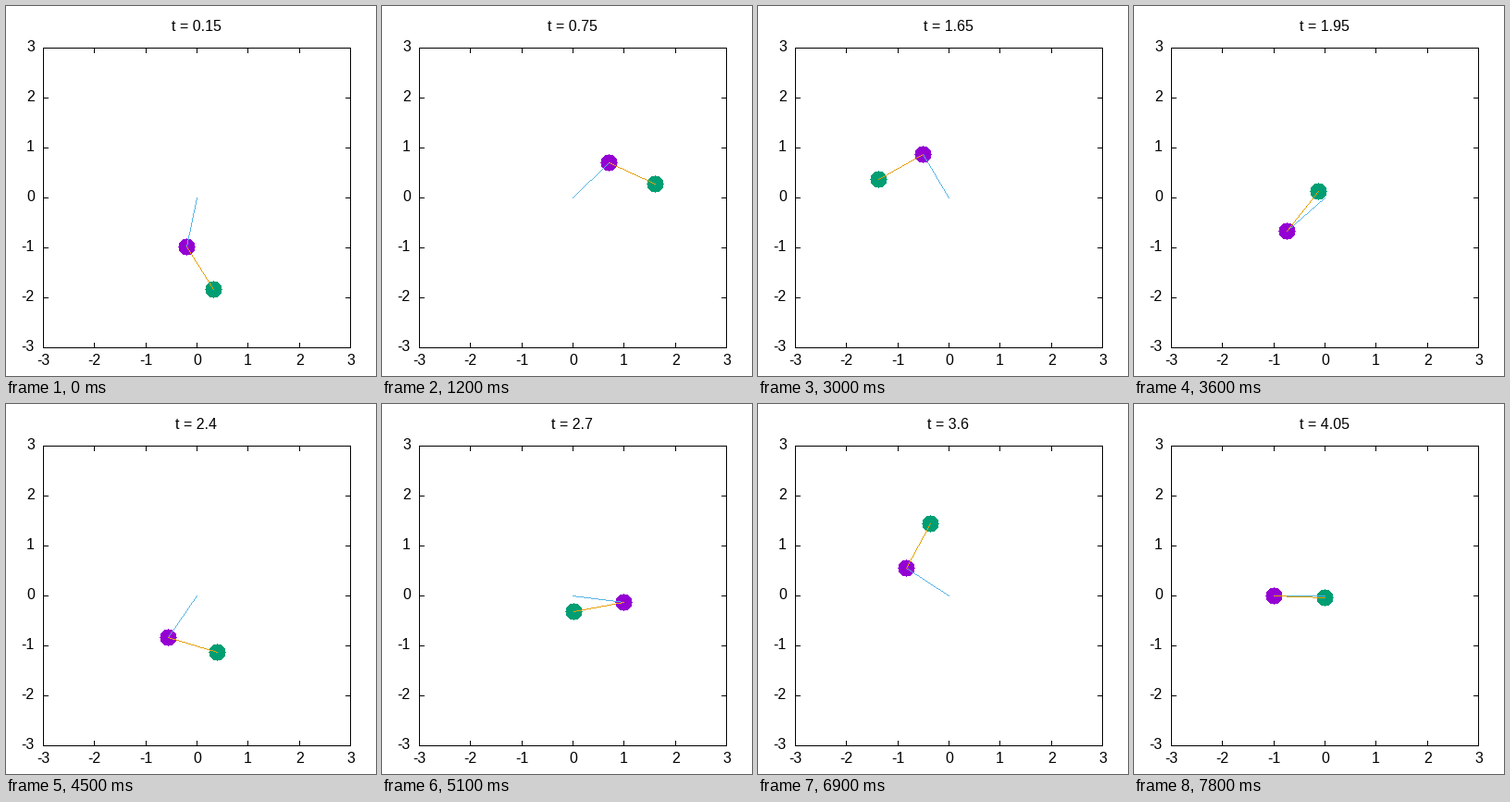
A matplotlib script for the animation above (8 s loop, 400x400 px).

```python
import math

import matplotlib.pyplot as plt
import numpy as np
from matplotlib.animation import FuncAnimation
from matplotlib.colors import to_rgb

SIZE, DPI = 400, 100
LEFT, RIGHT, TOP, BOTTOM = 40, 372, 45, 369
LIMIT, TICK, RADIUS = 3, 5, 9
POSES, DT, SUBSTEPS = 27, 0.15, 20
PURPLE, GREEN, BLUE, ORANGE = "#9400d3", "#009e73", "#56b4e9", "#e69f00"
FONT_PX = 16
TURN = 2 * math.pi

# Known poses: step number and the two unwrapped rod angles from straight down.
KEY_STEPS = [0, 7, 12, 15, 19, 23, 26]
KEY_ANGLES = np.array([
    (-0.200, 0.545),
    (3.160, 0.063 + 2 * TURN),
    (-0.838 + TURN, 2.499 + 3 * TURN),
    (-0.592 + TURN, 1.271 + 4 * TURN),
    (1.664 + TURN, 2.012 + 5 * TURN),
    (4.123 + TURN, 2.646 + 6 * TURN),
    (-1.571 + 2 * TURN, 1.534 + 7 * TURN),
])


def derivative(state, g):
    """Double pendulum with equal masses and unit rods."""
    a, b, va, vb = state
    c, s = math.cos(a - b), math.sin(a - b)
    x = -s * vb * vb - 2 * g * math.sin(a)
    y = s * va * va - g * math.sin(b)
    d = 2 - c * c
    return va, vb, (x - c * y) / d, (2 * y - c * x) / d


def shifted(state, slope, h):
    return [u + h * v for u, v in zip(state, slope)]


def rk4(state, g, h):
    k1 = derivative(state, g)
    k2 = derivative(shifted(state, k1, h / 2), g)
    k3 = derivative(shifted(state, k2, h / 2), g)
    k4 = derivative(shifted(state, k3, h), g)
    return [u + h / 6 * (p + 2 * q + 2 * r + w)
            for u, p, q, r, w in zip(state, k1, k2, k3, k4)]


def simulate(params):
    """Both angles at every step; params are angles, velocities, gravity."""
    *state, g = (float(p) for p in params)
    angles = [state[:2]]
    for _ in range(POSES - 1):
        for _ in range(SUBSTEPS):
            state = rk4(state, g, DT / SUBSTEPS)
        angles.append(state[:2])
    return np.array(angles)


def residual(params):
    return (simulate(params)[KEY_STEPS] - KEY_ANGLES).ravel()


def fit(params, rounds=30, eps=1e-5):
    """Levenberg-Marquardt fit of the swing to the known poses."""
    damping = 0.01
    error = residual(params)
    for _ in range(rounds):
        jac = np.array([(residual(params + eps * axis) - error) / eps
                        for axis in np.eye(len(params))]).T
        normal = jac.T @ jac
        normal += damping * np.diag(np.diag(normal))
        trial = params - np.linalg.solve(normal, jac.T @ error)
        trial_error = residual(trial)
        if trial_error @ trial_error < error @ error:
            params, error, damping = trial, trial_error, damping / 5
        else:
            damping *= 5
    return params


def to_pixel(x, y):
    px = LEFT + (x + LIMIT) * (RIGHT - LEFT) / (2 * LIMIT)
    py = BOTTOM - (y + LIMIT) * (BOTTOM - TOP) / (2 * LIMIT)
    return math.floor(px + 0.5), math.floor(py + 0.5)


# Hard-edged shapes, drawn pixel by pixel.
def draw_line(canvas, start, end, color="black"):
    (x0, y0), (x1, y1) = start, end
    count = max(abs(x1 - x0), abs(y1 - y0)) + 1
    xs = np.floor(np.linspace(x0, x1, count) + 0.5).astype(int)
    ys = np.floor(np.linspace(y0, y1, count) + 0.5).astype(int)
    canvas[ys, xs] = to_rgb(color)


def draw_disc(canvas, center, color):
    rows, cols = np.ogrid[:SIZE, :SIZE]
    inside = (cols - center[0]) ** 2 + (rows - center[1]) ** 2 <= RADIUS ** 2
    canvas[inside] = to_rgb(color)


def plot_box():
    canvas = np.ones((SIZE, SIZE, 3))
    for x in (LEFT, RIGHT):
        draw_line(canvas, (x, TOP), (x, BOTTOM))
    for y in (TOP, BOTTOM):
        draw_line(canvas, (LEFT, y), (RIGHT, y))
    for value in range(-LIMIT, LIMIT + 1):
        x, y = to_pixel(value, value)
        draw_line(canvas, (x, TOP), (x, TOP + TICK))
        draw_line(canvas, (x, BOTTOM), (x, BOTTOM - TICK))
        draw_line(canvas, (LEFT, y), (LEFT + TICK, y))
        draw_line(canvas, (RIGHT, y), (RIGHT - TICK, y))
    return canvas


def advance(text):
    """Pen advance in pixels, used to align text by its origin."""
    em = {"-": 0.333, "=": 0.584, "t": 0.278, " ": 0.278, ".": 0.278}
    return FONT_PX * sum(em.get(char, 0.556) for char in text)


def origin(x, text, share):
    return math.floor(x - share * advance(text))


def label(x, y, text, share=0.5):
    return ax.text(origin(x, text, share), y, text, ha="left", va="baseline",
                   color="black", fontname="Liberation Sans",
                   fontsize=FONT_PX * 72 / DPI)


fig = plt.figure(figsize=(SIZE / DPI, SIZE / DPI), dpi=DPI, facecolor="white")
ax = fig.add_axes([0, 0, 1, 1])
ax.axis("off")
BOX = plot_box()
picture = ax.imshow(BOX, extent=(0, SIZE, SIZE, 0), aspect="auto",
                    interpolation="nearest")
for number in range(-LIMIT, LIMIT + 1):
    tick_x, tick_y = to_pixel(number, number)
    label(tick_x + 0.5, 388, str(number))
    label(31, tick_y + 4, str(number), share=1)
title = label(206, 27, "")
ANGLES = simulate(fit(np.array([-0.2, 0.545, -3.9, 11.35, 0.5])))


def update(frame):
    step = min(frame // 3, POSES - 1)
    text = f"t = {DT * (step + 1):g}"
    title.set_text(text)
    title.set_x(origin(206, text, 0.5))

    a, b = ANGLES[step]
    x, y = math.sin(a), -math.cos(a)
    pivot, inner = to_pixel(0, 0), to_pixel(x, y)
    outer = to_pixel(x + math.sin(b), y - math.cos(b))
    canvas = BOX.copy()
    draw_disc(canvas, inner, PURPLE)
    draw_disc(canvas, outer, GREEN)
    draw_line(canvas, pivot, inner, BLUE)
    draw_line(canvas, inner, outer, ORANGE)
    picture.set_data(canvas)
    return [picture, title]


anim = FuncAnimation(fig, update, frames=80, interval=100, repeat=True,
                     repeat_delay=0, blit=False)
plt.show()
```
